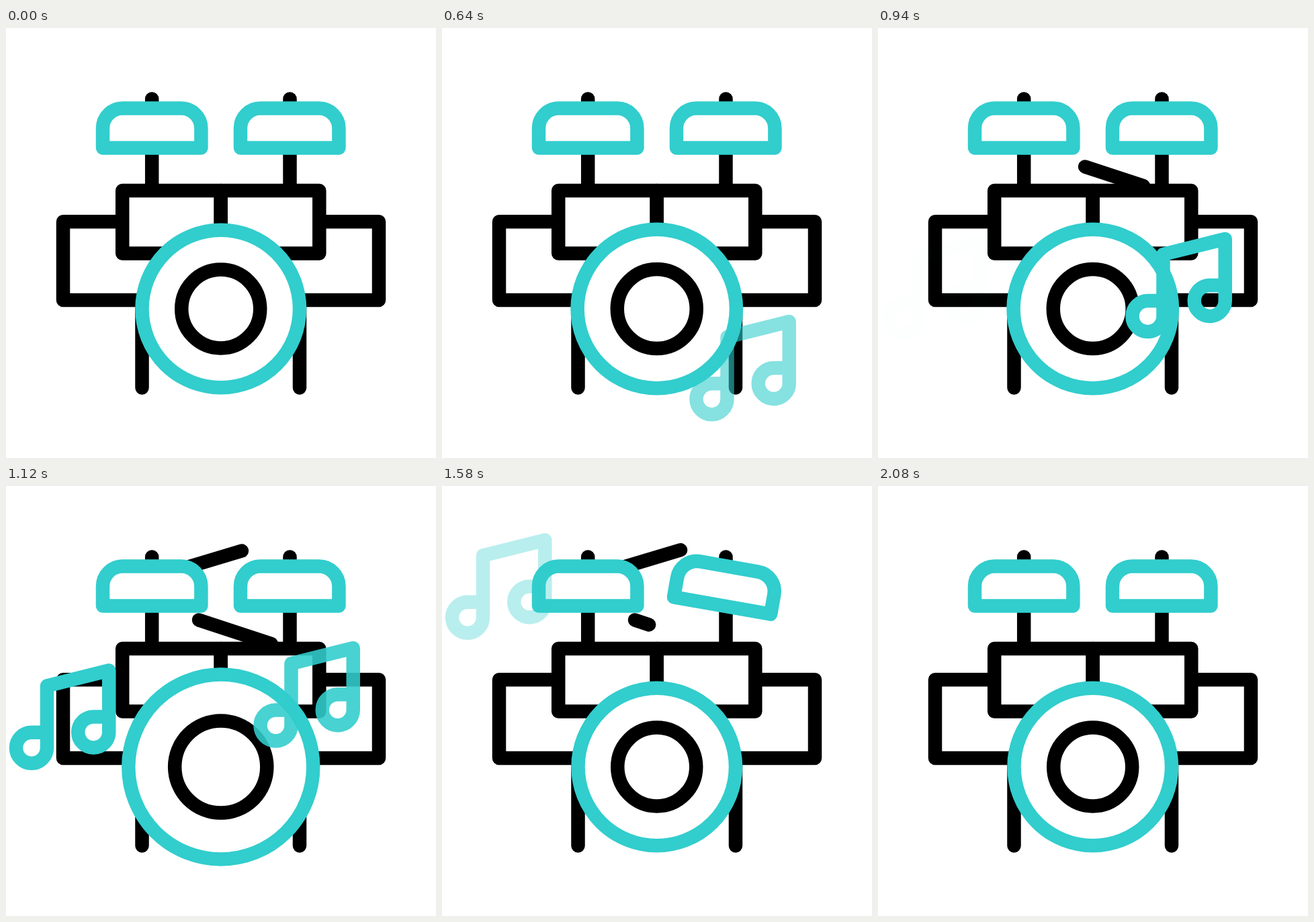
Animation, 640 px wide and 640 px high, one loop 2400 ms. Source, as an HTML page:

```html
<!DOCTYPE html>
<html lang="en">
<head>
<meta charset="utf-8">
<title>Drum kit</title>
<style>
  html, body { margin: 0; width: 100%; height: 100%; overflow: hidden; background: #fff; }
  svg { display: block; width: 100vw; height: 100vh; fill: #fff; stroke: #000; stroke-width: 20.5; stroke-linecap: round; stroke-linejoin: round; }
  .teal { stroke: #32cdcd; }
  .note { fill: none; }
</style>
</head>
<body>
<svg viewBox="0 0 640 640">
  <defs>
    <path id="cymbal" d="M-73.2 29.5V0a29.5 29.5 0 0 1 29.5-29.5H43.7A29.5 29.5 0 0 1 73.2 0V29.5Z"/>
    <path id="notes" d="M516.75 506.3H494a23 23 0 1 0 22.75 23V437.3L424.5 460.3V552.5a23 23 0 1 1-23-23H424.5"/>
  </defs>
  <path d="M85 288.3H555V405H85ZM202.5 405V535.5M437 405V535.5"/>
  <path id="stand"/>
  <path d="M422.5 105.5V242"/>
  <path id="leftTom"/>
  <path d="M319.75 242H466.3V335.5H319.75Z"/>
  <path id="lowStick"/>
  <path id="highStick"/>
  <use href="#cymbal" class="teal" transform="translate(217.2 149)"/>
  <use id="rightCymbal" href="#cymbal" class="teal"/>
  <circle id="rim" class="teal" cx="319.75" cy="418"/>
  <circle id="hub" cx="319.75" cy="418"/>
  <use id="rightNotes" href="#notes" class="teal note"/>
  <use id="leftNotes" href="#notes" class="teal note"/>
</svg>
<script>
const LOOP = 2400;
const linear = u => u;
const smooth = u => u * u * (3 - 2 * u);
const $ = id => document.getElementById(id);
const set = (id, name, value) => $(id).setAttribute(name, value);

// Value at time t on a list of [time, value] keys
function at(t, keys, ease = smooth) {
  const i = keys.findIndex(k => k[0] > t);
  if (i === 0) return keys[0][1];
  if (i < 0) return keys[keys.length - 1][1];
  const [t0, a] = keys[i - 1], [t1, b] = keys[i];
  return a + (b - a) * ease((t - t0) / (t1 - t0));
}

const beat = [[0, 1], [125, 1.19], [320, 1.008], [1020, 1.008], [1145, 1.19], [1320, 1]];
const squash = [[1200, 0], [1320, 28], [1440, 0]];
const swing = [[1295, 0], [1420, -10], [1580, 10], [1760, -6], [1920, 3], [2080, 0]];
const strike = [[1180, 0], [1320, -10.3], [1460, 0]];
const lift = [[0, 0], [40, 2], [80, 8], [160, 33], [380, 131], [640, 236], [680, 249], [700, 252]];

// Grows from the tip to the butt, later shrinks the same way
function drawStick(id, t, butt, tip, growAt, shrinkAt, angle = 0) {
  const head = at(t, [[growAt, 0], [growAt + 240, 1]], linear);
  const tail = at(t, [[shrinkAt, 0], [shrinkAt + 220, 1]], linear);
  const point = u => tip.map((v, i) => v + (butt[i] - v) * u).join(" ");
  set(id, "d", head > tail ? `M${point(tail)}L${point(head)}` : "");
  set(id, "transform", `rotate(${angle} ${(butt[0] + tip[0]) / 2} ${(butt[1] + tip[1]) / 2})`);
}

function drawNotes(id, age, dx, dy) {
  set(id, "transform", `translate(${dx} ${dy - at(age, lift, linear)})`);
  set(id, "opacity", Math.max(0, Math.min(1, age / 138, (690 - age) / 145)));
}

function draw(t) {
  const scale = at(t, beat), top = 242 + at(t, squash);
  set("rim", "r", 117.25 * scale);
  set("hub", "r", 58.5 * scale);
  set("stand", "d", `M217.2 105.5V${top}`);
  set("leftTom", "d", `M173.2 ${top}H319.75V335.5H173.2Z`);
  set("rightCymbal", "transform", `translate(422.2 149) rotate(${at(t, swing)})`);
  drawStick("lowStick", t, [287, 199.5], [395, 235], 748, 1404, at(t, strike));
  drawStick("highStick", t, [355, 95.3], [246, 128], 890, 1545);
  drawNotes("rightNotes", t - 560, 0, 8);
  drawNotes("leftNotes", t - 940, -363.5, -120.5);
}

const start = performance.now();
function frame() {
  draw((performance.now() - start) % LOOP);
  requestAnimationFrame(frame);
}
frame();
</script>
</body>
</html>
```
